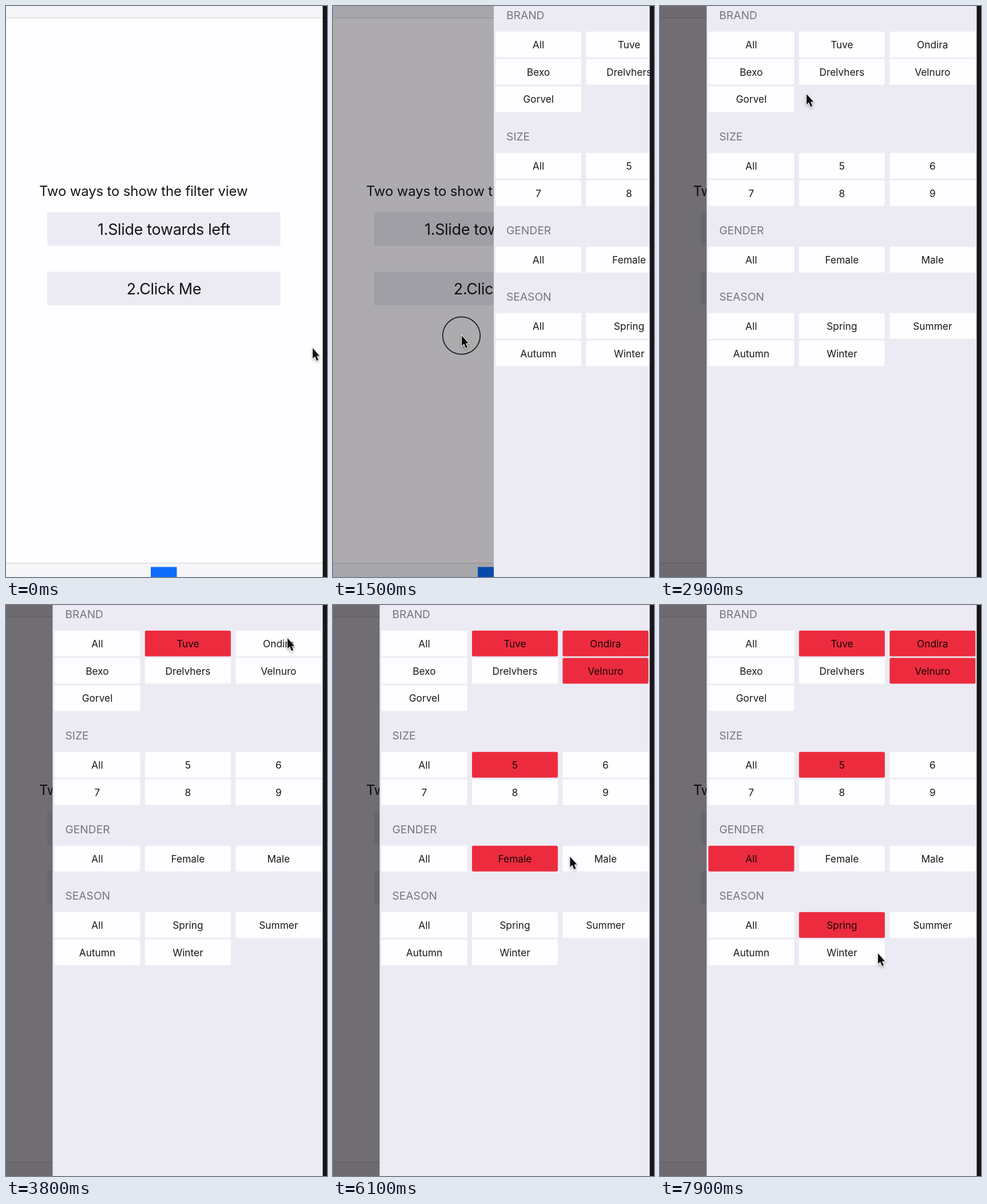
Recreate the animation shown at these times as an HTML page with a canvas. Size 561 by 998 pixels, loop 8000 ms.

```html
<!DOCTYPE html>
<html lang="en">
<head>
<meta charset="utf-8">
<title>Filter panel</title>
<style>
html, body { margin: 0; width: 561px; height: 998px; overflow: hidden; }
canvas { display: block; }
</style>
</head>
<body>
<canvas id="stage" width="561" height="998"></canvas>
<script>
const ctx = document.getElementById('stage').getContext('2d');
const LOOP = 8000, STEP = 100;
const HOLD = 200, CLICK = 100, COLLAPSE = 340, FADE = 250;
const PRESS = 500, RELEASE = 2100;
const EDGE = 554, OPEN = 81.5, HEIGHT = 998;
const WHITE = [254, 253, 255], RED = [236, 44, 62];
const INK = '#151517', BAR = '#f6f5f8', LINE = '#dddcdf', LILAC = '#ecebf3';

const sections = {
  BRAND: ['Tuve', 'Ondira', 'Bexo', 'Drelvhers', 'Velnuro', 'Gorvel'],
  SIZE: ['5', '6', '7', '8', '9'],
  GENDER: ['Female', 'Male'],
  SEASON: ['Spring', 'Summer', 'Autumn', 'Winter']
};

// Where the pointer rests, and which option it picks there
const stops = [
  { at: 0, x: 535, y: 597 },
  { at: 500, x: 496, y: 592 },
  { at: 1500, x: 224, y: 575 },
  { at: 1900, x: 19, y: 552 },
  { at: 3200, x: 308, y: 64, pick: 'Tuve' },
  { at: 3800, x: 491, y: 57, pick: 'Ondira' },
  { at: 4400, x: 488, y: 110, pick: 'Velnuro' },
  { at: 5200, x: 345, y: 263, pick: '5' },
  { at: 5650, x: 330, y: 436, pick: 'Female' },
  { at: 6300, x: 473, y: 441, pick: 'Male' },
  { at: 6600, x: 473, y: 441 },
  { at: 7300, x: 332, y: 555, pick: 'Spring' },
  { at: 7900, x: 380, y: 608 }
];

const clamp = v => Math.max(0, Math.min(1, v));
const mix = (a, b, p) => a + (b - a) * p;
const smooth = p => p * p * (3 - 2 * p);

function pickTime(label) {
  const stop = stops.find(s => s.pick === label);
  return stop ? stop.at + CLICK : Infinity;
}

function pointerAt(t) {
  const to = stops.find(s => s.at > t) || stops.at(-1);
  const from = stops[stops.indexOf(to) - 1];
  const leave = from.at + HOLD;
  const p = smooth(clamp((t - leave) / (to.at - leave)));
  return { x: mix(from.x, to.x, p), y: mix(from.y, to.y, p) };
}

// The panel follows the drag from the right edge
function panelAt(t, x) {
  const drag = stops[1].x + 1 - x;
  return t < PRESS ? EDGE : t >= RELEASE ? OPEN : Math.max(OPEN, Math.min(EDGE, EDGE - drag));
}

function rect(x, y, w, h, fill, radius = 0) {
  ctx.fillStyle = fill;
  ctx.beginPath();
  ctx.roundRect(x, y, w, h, radius);
  ctx.fill();
}

function text(str, x, y, size, { fill = INK, align = 'center', spacing = 0 } = {}) {
  ctx.font = `${size}px Inter, "Liberation Sans", sans-serif`;
  ctx.letterSpacing = spacing + 'px';
  ctx.textAlign = align;
  ctx.fillStyle = fill;
  ctx.fillText(str, x, y);
}

function pageButton(label, y) {
  rect(72, y, 407.5, 58.5, LILAC);
  text(label, 276, y + 39.5, 27, { spacing: -0.35 });
}

function drawPage() {
  rect(0, 0, EDGE, HEIGHT, `rgb(${WHITE})`);
  rect(0, 0, EDGE, 20, BAR);
  rect(0, 20, EDGE, 1.5, LINE);
  rect(0, 973, EDGE, 25, BAR);
  rect(0, 973, EDGE, 1.5, LINE);
  rect(253, 980.5, 45.5, 18, '#0b6df9');
  text('Two ways to show the filter view', 58, 332, 24, { align: 'left', spacing: -0.16 });
  pageButton('1.Slide towards left', 360.5);
  pageButton('2.Click Me', 464.5);
}

function cellColor(t, on, off) {
  const fadeIn = clamp((t - on) / FADE), fadeOut = clamp((t - off) / FADE);
  const shade = 1 - 0.11 * Math.sin(Math.PI * fadeOut);
  return `rgb(${WHITE.map((w, i) => Math.round(mix(w, RED[i], fadeIn * (1 - fadeOut)) * shade))})`;
}

function drawPanel(t, left) {
  rect(left, 0, EDGE - left, HEIGHT, LILAC);
  let y = 15.5;
  for (const [title, options] of Object.entries(sections)) {
    text(title, left + 22, y + 7, 19.2, { fill: '#77767b', align: 'left' });
    // Picking every option of a section collapses the picks into "All"
    const allTime = Math.max(...options.map(pickTime)) + COLLAPSE;
    const labels = ['All', ...options];
    labels.forEach((label, i) => {
      const x = left + 3 + (i % 3) * 158.4;
      const top = y + 29.3 + Math.floor(i / 3) * 47.7;
      const color = i ? cellColor(t, pickTime(label), allTime) : cellColor(t, allTime, Infinity);
      rect(x, top, 150, 45, color, 2.5);
      text(label, x + 75, top + 29, 17.3, { fill: 'rgba(0,0,0,.9)' });
    });
    y += Math.ceil(labels.length / 3) * 48 + 68;
  }
}

function drawPointer(x, y, pressed) {
  if (pressed) {
    ctx.beginPath();
    ctx.arc(x + 0.5, y + 1, 32.7, 0, 7);
    ctx.strokeStyle = '#1c1c1e';
    ctx.lineWidth = 1.7;
    ctx.stroke();
  }
  ctx.save();
  ctx.translate(x, y);
  ctx.shadowColor = 'rgba(0,0,0,.35)';
  ctx.shadowBlur = 4;
  ctx.shadowOffsetY = 2;
  const arrow = new Path2D('M1 1V19L5 15.5L8 23L11 21.7L8 14.5H13Z');
  ctx.strokeStyle = '#f4f4f6';
  ctx.lineWidth = 2;
  ctx.stroke(arrow);
  ctx.shadowColor = 'transparent';
  ctx.fillStyle = '#0c0c0d';
  ctx.fill(arrow);
  ctx.restore();
}

function draw(t) {
  const { x, y } = pointerAt(t), left = panelAt(t, x);
  drawPage();
  rect(0, 0, EDGE, HEIGHT, `rgba(4,0,8,${0.565 * (EDGE - left) / (EDGE - OPEN)})`);
  if (left < EDGE - 1) drawPanel(t, left);
  rect(EDGE - 0.5, 0, 8, HEIGHT, '#171719');
  drawPointer(x, y, t >= PRESS && t < RELEASE);
}

const start = performance.now();
function tick() {
  const t = (performance.now() - start) % LOOP;
  draw(Math.floor(t / STEP) * STEP);
  requestAnimationFrame(tick);
}
tick();
</script>
</body>
</html>
```
